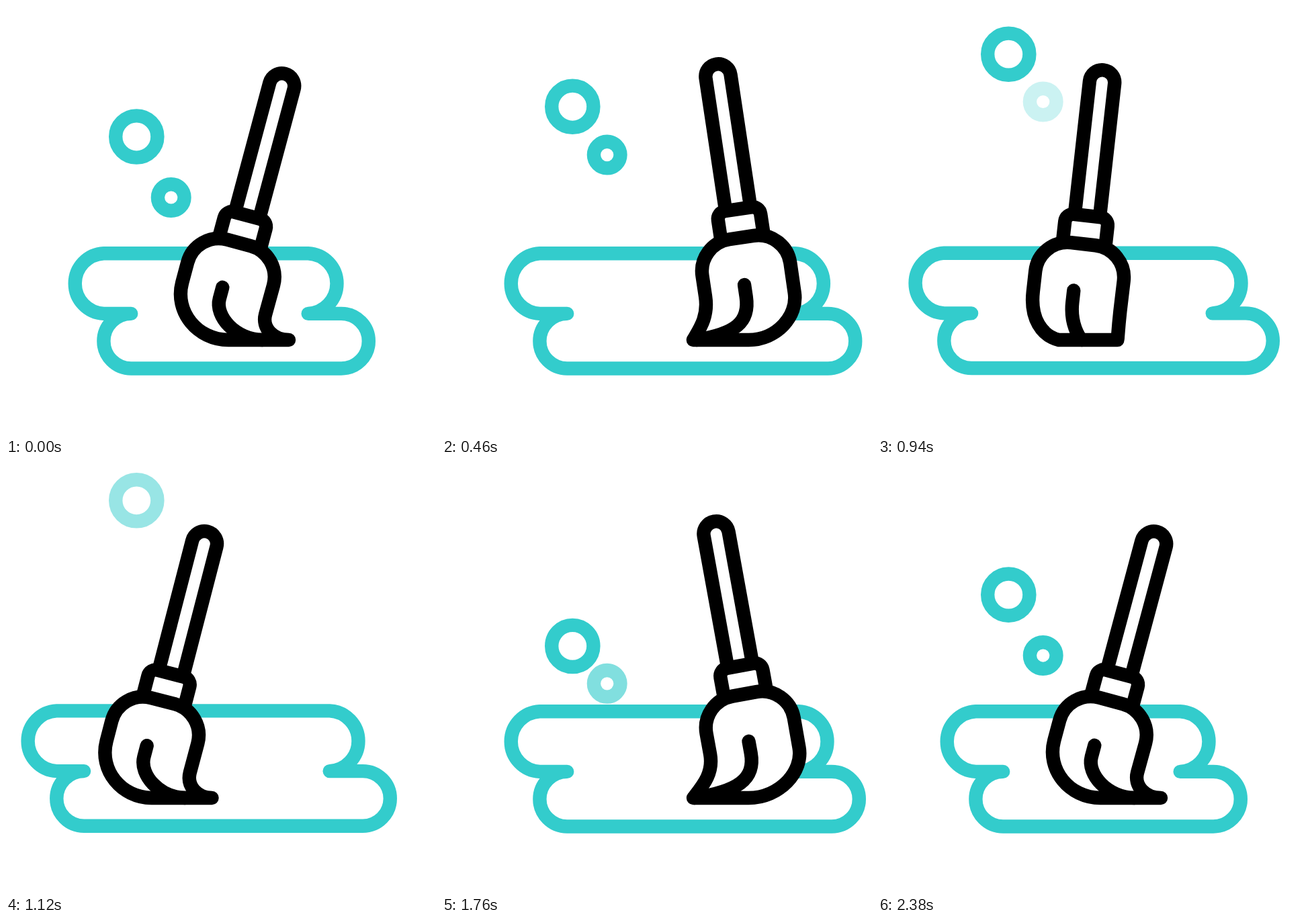
Write an HTML page that moves like this. It is 640x640 px and loops after 2400 ms.

```html
<!DOCTYPE html>
<html lang="en">
<head>
<meta charset="utf-8">
<title>Mop and bubbles</title>
<style>
html, body { margin: 0; width: 100%; height: 100%; overflow: hidden; background: #fff; }
svg { display: block; width: 100%; height: 100%; }
</style>
</head>
<body>
<svg viewBox="0 0 640 640" fill="none" stroke-width="20.4" stroke-linecap="round" stroke-linejoin="round">
  <g stroke="#33cccc">
    <path id="puddle"/>
    <circle id="big" cx="194.3" r="31.1"/>
    <circle id="small" cx="245.7" r="19.8"/>
  </g>
  <g stroke="#000" fill="#fff">
    <g id="handle">
      <path d="M-18.7 3V-195a18.7 18.7 0 0 1 37.4 0V3"/>
      <path d="M-32 47V16.5a12 12 0 0 1 12-12H20a12 12 0 0 1 12 12V47"/>
    </g>
    <path id="head"/>
    <path id="crease" fill="none"/>
  </g>
</svg>
<script>
const LOOP = 2400, FLOOR = 497, REACH = 195;
const el = id => document.getElementById(id);
const lerp = (a, b, k) => a + (b - a) * k;
const ramp = (t, a, b) => Math.min(1, Math.max(0, (t - a) / (b - a)));
const smooth = s => s * s * (3 - 2 * s);
const n = v => v.toFixed(2);

// cubic-bezier(.6, 0, .4, 1)
function ease(x) {
  let lo = 0, hi = 1;
  for (let i = 0; i < 24; i++) {
    const s = (lo + hi) / 2, r = 1 - s;
    if (1.8 * s * r * r + 1.2 * s * s * r + s * s * s < x) lo = s; else hi = s;
  }
  return smooth(lo);
}

// swing: 0 leans right, 1 leans left; left and right move the puddle's ends
const stops = [
  { time: 0, swing: 0, neck: 360, left: 0, right: 0 },
  { time: 600, swing: 1, neck: 446, left: 0, right: 81 },
  { time: 1200, swing: 0, neck: 242.5, left: -71.5, right: 31 },
  { time: 1760, swing: 1, neck: 443, left: 0, right: 81 },
  { time: 2330, swing: 0, neck: 360, left: 0, right: 0 }
];

function drawBroom(m, x) {
  const tilt = lerp(15, -10.3, m), a = tilt * Math.PI / 180;
  const cos = Math.cos(a), sin = Math.sin(a);
  const y = 119 - 15 * m + REACH * cos;
  // Points fixed to the tilted handle, and points measured from the floor
  const on = (u, v) => `${n(x + u * cos - v * sin)} ${n(y + u * sin + v * cos)} `;
  const low = (u, up = 0) => `${n(x + u)} ${n(FLOOR - up)} `;

  el('handle').setAttribute('transform', `translate(${n(x)} ${n(y)}) rotate(${n(tilt)})`);

  const heel = lerp(-29, -69, m), toe = lerp(61, 13, m);
  el('head').setAttribute('d',
    'M' + low(heel) +
    'C' + low(heel + lerp(-46, 14, m), 18 * m) + on(-67.5, lerp(171, 155, m)) + on(-67.5, 126) +
    'L' + on(-67.5, 95) + 'A48 48 0 0 1 ' + on(-19.5, 47) +
    'L' + on(16.8, 47) + 'A48 48 0 0 1 ' + on(64.8, 95) +
    'L' + on(64.5, 140) +
    'C' + on(64.5, lerp(160, 176, m)) + low(toe + lerp(-24, 47, m)) + low(toe) + 'Z');

  el('crease').setAttribute('d',
    'M' + on(-7.6, 117.4) + 'L' + on(-7.6, 135) +
    'C' + on(-7.6, lerp(162, 175, m)) + low(lerp(-18, -3, m), 10 * m) + low(lerp(22, -67, m)));
}

function drawPuddle(l, r) {
  const rise = l / 90, top = n(368.2 + rise), mid = n(457.9 + rise), end = n(539.5 + rise);
  const ear = x => `A44.9 44.9 0 0 1 ${x} `;
  const foot = x => `A40.8 40.8 0 0 1 ${x} `;
  const earL = n(145.5 + l), earR = n(449.7 + r), footL = n(186.2 + l), footR = n(499 + r);
  el('puddle').setAttribute('d',
    `M${footL} ${mid}H${earL}${ear(earL)}${top}H${earR}${ear(earR)}${mid}` +
    `H${footR}${foot(footR)}${end}H${footL}${foot(footL)}${mid}Z`);
}

// Rises and fades out, then returns from below to its resting height
function drawBubble(id, t, o) {
  const back = t >= o.gone;
  const y = back
    ? lerp(o.low, o.rest, smooth(ramp(t, o.back, LOOP)))
    : lerp(o.rest, o.rest - 144, smooth(ramp(t, 0, o.gone)));
  const alpha = back
    ? ramp(t, o.back + 60, o.back + 320)
    : 1 - ramp(t, o.gone - 240, o.gone);
  el(id).setAttribute('cy', n(y));
  el(id).setAttribute('opacity', alpha.toFixed(3));
}

function draw(t) {
  let i = 0;
  while (i < stops.length - 2 && t >= stops[i + 1].time) i++;
  const from = stops[i], to = stops[i + 1];
  const k = ease(ramp(t, from.time, to.time));
  const at = key => lerp(from[key], to[key], k);

  drawBroom(at('swing'), at('neck'));
  drawPuddle(at('left'), at('right'));
  drawBubble('big', t, { rest: 194.5, low: 311.5, gone: 1240, back: 1340 });
  drawBubble('small', t, { rest: 285, low: 335, gone: 1000, back: 1540 });
}

let start = null;
function tick(now) {
  if (start === null) start = now;
  draw((now - start) % LOOP);
  requestAnimationFrame(tick);
}
draw(0);
requestAnimationFrame(tick);
</script>
</body>
</html>
```
